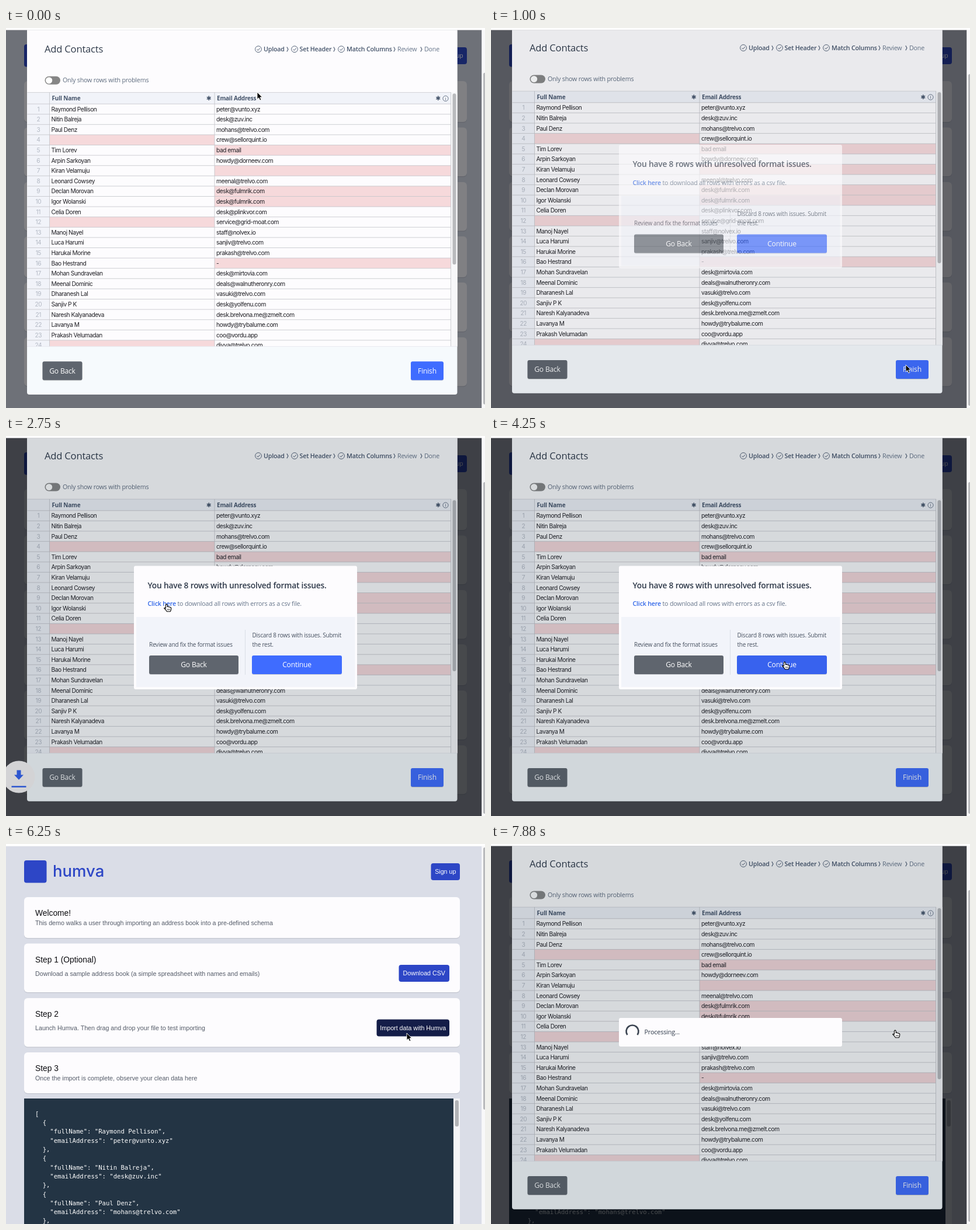
Write an HTML page that moves like this. It is 820 px wide and 651 px high and loops after 8 s.

```html
<!DOCTYPE html>
<html lang="en">
<head>
<meta charset="utf-8">
<title>Contact import</title>
<style>
  html, body { margin: 0; width: 100%; height: 100%; overflow: hidden; background: #fff; }
  svg { display: block; width: 820px; height: 651px; }
  text { white-space: pre; }
  .ui { font-family: "Open Sans", "Noto Sans", sans-serif; letter-spacing: -.2px; }
  .cell { font-family: Inter, Roboto, sans-serif; letter-spacing: -.46px; }
  .page { font-family: "Liberation Sans", Arial, sans-serif; }
  .logo { font-family: Inter, "Open Sans", sans-serif; font-weight: 500; }
  .code { font-family: "DejaVu Sans Mono", monospace; }
  .sym { font-family: "DejaVu Sans", sans-serif; }
</style>
</head>
<body>
<svg id="stage" viewBox="0 0 820 651" xmlns="http://www.w3.org/2000/svg"></svg>
<script>
const LOOP = 8000, TICK = 125, ROW = 17.6;
const WHITE = '#fdfcfe', BLUE = '#2d46c6', ACTION = '#3f6cff', SLATE = '#5f656e';

const contacts = [
  ['Raymond Pellison', 'peter@vunto.xyz'],
  ['Nitin Balreja', 'desk@zuv.inc'],
  ['Paul Denz', 'mohans@trelvo.com'],
  ['', 'crew@sellorquint.io'],
  ['Tim Lorev', 'bad email', 1],
  ['Arpin Sarkoyan', 'howdy@dorneev.com'],
  ['Kiran Velamuju', '', 1],
  ['Leonard Cowsey', 'meenal@trelvo.com'],
  ['Declan Morovan', 'desk@fulmrik.com', 1],
  ['Igor Wolanski', 'desk@fulmrik.com', 1],
  ['Celia Doren', 'desk@plinkvor.com'],
  ['', 'service@grid-moat.com'],
  ['Manoj Nayel', 'staff@nolvex.io'],
  ['Luca Harumi', 'sanjiv@trelvo.com'],
  ['Harukai Morine', 'prakash@trelvo.com'],
  ['Bao Hestrand', '-', 1],
  ['Mohan Sundravelan', 'desk@mirtovia.com'],
  ['Meenal Dominic', 'deals@walnutheronry.com'],
  ['Dharanesh Lal', 'vasuki@trelvo.com'],
  ['Sanjiv P K', 'desk@yolfenu.com'],
  ['Naresh Kalyanadeva', 'desk.brelvona.me@zmelt.com'],
  ['Lavanya M', 'howdy@trybalume.com'],
  ['Prakash Velumadan', 'coo@vordu.app'],
  ['', 'divya@trelvo.com']
];

const box = (x, y, w, h, fill, r = 0, more = '') =>
  `<rect x="${x}" y="${y}" width="${w}" height="${h}" rx="${r}" fill="${fill}" ${more}/>`;
const label = (cls, x, y, size, fill, str, more = '') =>
  `<text class="${cls}" x="${x}" y="${y}" font-size="${size}" fill="${fill}" ${more}>${str}</text>`;
const line = (x1, y1, x2, y2, color) =>
  `<path d="M${x1} ${y1}L${x2} ${y2}" stroke="${color}" stroke-width=".8"/>`;
const MID = 'text-anchor="middle"', SEMI = 'font-weight="600"', BOLD = 'font-weight="700"';

function button(cls, x, y, w, h, fill, str, size, more = '') {
  return box(x, y + 1, w, h, 'rgba(0,0,0,.16)', 3) + box(x, y, w, h, fill, 3, more) +
    label(cls, x + w / 2, y + h / 2 + size * .36, size, '#fff', str, MID);
}

// The demo page; "wide" is its layout while the importer is open.
function drawPage(wide, done, hover) {
  const dx = wide ? 12 : 0, w = 746 + dx;
  const card = (y, h) => box(31, y + 1.2, w, h, '#c3c6d0', 6) + box(31, y, w, h, WHITE, 6);
  const head = (y, str) => label('page', 50, y, 13.8, '#0b0b0f', str);
  const note = (y, str) => label('page', 50, y, 10.7, '#545b68', str);
  const btn = (x, y, bw, str, fill = BLUE) =>
    box(x + dx, y, bw, 29, fill, 4) +
    label('page', x + dx + bw / 2, y + 18.3, 10.7, '#fff', str, MID);

  let s = box(0, 3.5, 814.5, 648, '#dadde7') +
    box(31, 28, 38.5, 38.5, BLUE, 4) +
    label('logo', 80, 56, 27.5, BLUE, 'humva') +
    btn(727.5, 33, 49.5, 'Sign up') +
    card(91, 70) + head(123, 'Welcome!') +
    note(139, 'This demo walks a user through importing an address book into a pre-defined schema') +
    card(170.5, 83.5) + head(202.5, 'Step 1 (Optional)') +
    note(225.5, 'Download a sample address book (a simple spreadsheet with names and emails)') +
    btn(672.5, 207, 86.5, 'Download CSV') +
    card(264, 83.5) + head(295.5, 'Step 2') +
    note(318.5, 'Launch Humva. Then drag and drop your file to test importing') +
    btn(634.5, 300.5, 124.5, 'Import data with Humva', hover ? '#141d48' : BLUE) +
    card(357, 70) + head(388.5, 'Step 3') +
    note(405, 'Once the import is complete, observe your clean data here');

  if (!done) return s + card(436, 84) + card(530, 83.5);

  s += box(31, 436, w, 216, '#f4f4f6') + box(31, 436, w - 11, 216, '#233444') +
    box(768.5 + dx, 439, 6.5, 45, '#b2b3b6', 3.2);
  const json = [[0, '[']];
  for (const [name, mail] of contacts.slice(0, 3))
    json.push([2, '{'], [4, `"fullName": "${name}",`], [4, `"emailAddress": "${mail}"`], [2, '},']);
  json.forEach(([col, str], i) => {
    s += label('code', 50 + col * 6.33, 465.8 + i * 15.3, 10.6, '#fff', str);
  });
  return s;
}

function drawTable() {
  const top = 127.8, grid = '#c2c3c8', side = '#f1f3f9', ink = '#44536a';
  let s = box(36.5, 108, 725, 436, WHITE) + box(36.5, 108, 38, 436, side) +
    box(36.5, 108, 725, 19.8, side) + line(36.5, 108, 762, 108, grid);
  contacts.forEach(([name, mail, bad], i) => {
    const y = top + i * ROW, base = y + 12.5;
    if (!name) s += box(74.5, y, 282.5, ROW, '#f6d9db');
    if (bad) s += box(357, y, 404.5, ROW, '#f6d9db');
    s += line(36.5, y, 761.5, y, grid) +
      label('cell', 55.3, base, 10.2, '#b3b9c4', i + 1, MID) +
      label('cell', 77.5, base, 10.2, '#1d1d22', name) +
      label('cell', 360, base, 10.2, '#1d1d22', mail);
  });
  for (const x of [74.5, 357, 761.5]) s += line(x, 108, x, 544, grid);
  return s + label('ui', 78.5, 122, 10, ink, 'Full Name', BOLD) +
    label('ui', 361, 122, 10, ink, 'Email Address', BOLD) +
    label('sym', 347.5, 122, 10.5, ink, '✱', MID) +
    label('sym', 740, 122, 10.5, ink, '✱', MID) +
    `<circle cx="752.5" cy="118.5" r="4.6" fill="none" stroke="${ink}" stroke-width=".8"/>` +
    label('ui', 752.5, 121.3, 7.5, ink, 'i', MID) +
    box(762, 108, 10.5, 436, '#f7f7f9') + box(764.5, 110, 6, 293, '#b9babd', 3);
}

function drawSteps() {
  const ink = '#46556c', soft = '#66758a';
  const check = x => `<circle cx="${x}" cy="34" r="5.4" fill="none" stroke="${ink}" stroke-width=".9"/>` +
    `<path d="M${x - 2.5} 34.2l1.9 1.9 3.3-3.9" fill="none" stroke="${ink}"/>`;
  const chevron = x => `<path d="M${x - 1.2} 30.2l2.2 4-2.2 4" fill="none" stroke="${ink}" stroke-width="1.1"/>`;
  return [432, 494, 574].map(check).join('') + [482, 562, 665, 711].map(chevron).join('') +
    label('ui', 441, 38, 10.7, ink, 'Upload', SEMI) +
    label('ui', 502.5, 38, 10.7, ink, 'Set Header', SEMI) +
    label('ui', 583, 38, 10.7, ink, 'Match Columns', SEMI) +
    label('ui', 670, 38, 10.7, soft, 'Review') + label('ui', 716, 38, 10.7, soft, 'Done');
}

const modalArt = box(36, -10, 736.5, 635.7, '#f6fafd', 4) + box(36, -10, 736.5, 553, WHITE) +
  label('ui', 66, 39.8, 16.6, '#2f3a4a', 'Add Contacts') + drawSteps() +
  box(66.5, 80.5, 26.5, 14, '#868686', 7) + '<circle cx="73.6" cy="87.5" r="5.6" fill="#fff"/>' +
  label('ui', 97, 91, 10.7, '#5d6b7e', 'Only show rows with problems') +
  `<g clip-path="url(#tableClip)">${drawTable()}</g>` + line(36, 543.3, 772.5, 543.3, '#e2e6ec') +
  button('ui', 62.5, 569, 68, 32, SLATE, 'Go Back', 12.1) +
  button('ui', 693, 569, 56, 32, ACTION, 'Finish', 12.1) +
  box(36, -10, 736.5, 635.7, '#102230', 4, 'id="dim"');

const dialogArt = box(219, 222.5, 382, 211.5, WHITE, 3) + box(223, 310, 374.5, 120, '#f2f4fa') +
  label('ui', 242.5, 260.5, 13.8, '#2f3a4a', 'You have 8 rows with unresolved format issues.', SEMI) +
  label('ui', 242.5, 291, 10.7, '#66758a',
    `<tspan fill="#3066e8" font-weight="600">Click here</tspan> to download all rows with errors as a csv file.`) +
  line(409.5, 332, 409.5, 409, '#d4d8e0') +
  label('ui', 245, 360.5, 9.95, '#46505f', 'Review and fix the format issues') +
  label('ui', 421.5, 344.8, 9.95, '#46505f', 'Discard 8 rows with issues. Submit') +
  label('ui', 421.5, 360.5, 9.95, '#46505f', 'the rest.') +
  button('ui', 245, 376, 153, 32, SLATE, 'Go Back', 12.1) +
  button('ui', 421, 376, 154, 32, ACTION, 'Continue', 12.1, 'id="go"');

const busyArt = box(219, 298, 382, 49, WHITE, 3) +
  '<path id="spin" d="M233.4 327A10.5 10.5 0 1 1 250.6 327" fill="none" stroke="#3c4552" stroke-width="2.7"/>' +
  label('ui', 262.5, 326, 10.9, '#2f3a4a', 'Processing...');

const loadArt = '<circle cx="22" cy="584" r="27.5" fill="#d3d3d5"/>' +
  '<path d="M18.5 572.5h7v8h4.5l-8 8.5-8-8.5h4.5zM9.5 599.5h25v2.6h-25z" fill="#2d56cf"/>';

const arrowArt = '<path d="M0 0V12.2L2.8 9.6 4.8 14 6.9 13.1 5 8.8H8.8Z" fill="#000" stroke="#fff" stroke-width=".9"/>';
const handArt = '<path d="M-1.6 1.2Q-.2-.9 1.2 1.2V4.6Q2.6 3.6 3.6 5 5.2 4.4 5.9 5.7 7.6 5.3 7.8 7L7.4 10.2 6.2 12.8H.4' +
  'L-1.4 10-4.3 7.2Q-3.7 5.6-1.6 7.2Z" fill="#fff" stroke="#000" stroke-width="1.1" stroke-linejoin="round"/>' +
  '<path d="M1.6 8v2.6M3.4 8v2.6M5.2 8v2.6" stroke="#000" stroke-width=".7"/>';

const stage = document.getElementById('stage');
stage.innerHTML = `<defs>
    <clipPath id="tableClip">${box(36, 107.5, 737, 435.8, '#000')}</clipPath>
    <clipPath id="view">${box(0, 3.5, 820, 648, '#000')}</clipPath>
  </defs>
  ${box(0, 0, 820, 651, '#fff')}
  <g id="page" clip-path="url(#view)"></g>
  ${box(0, 3.5, 814.5, 648, '#04060a', 0, 'id="shade"')}
  <g clip-path="url(#view)"><g id="modal">${modalArt}</g></g>
  <g id="dialog">${dialogArt}</g><g id="busy">${busyArt}</g>
  <g id="load">${loadArt}</g>
  ${box(814.5, 3.5, 6, 648, '#f8f8f9')}${box(817, 0, 5, 10, '#b9babd', 2.5, 'id="thumb"')}
  <g id="arrow">${arrowArt}</g><g id="hand">${handArt}</g>`;

const el = {};
stage.querySelectorAll('[id]').forEach(n => el[n.id] = n);
const put = (id, attrs) => { for (const k in attrs) el[id].setAttribute(k, attrs[k]); };
const within = (t, a, b) => t >= a && t < b;
const smooth = u => u * u * (3 - 2 * u);

// Value at time t along keys [time, value...]
function track(keys, t, ease = u => u) {
  if (t <= keys[0][0]) return keys[0].slice(1);
  for (let i = 1; i < keys.length; i++) {
    const a = keys[i - 1], b = keys[i];
    if (t <= b[0]) {
      const u = ease((t - a[0]) / (b[0] - a[0]));
      return a.slice(1).map((v, k) => v + (b[k + 1] - v) * u);
    }
  }
  return keys[keys.length - 1].slice(1);
}

const pointer = [
  [0, 430, 110], [750, 710, 577], [1250, 710, 577], [2250, 275, 288], [3250, 275, 288],
  [4000, 503, 387], [4375, 503, 387], [4750, 506, 391], [5000, 506, 391], [5250, 548, 377],
  [5375, 548, 377], [5750, 634, 347], [5875, 634, 347], [6250, 686, 324], [6500, 692, 319]
];
const alert = [[875, 0], [1000, .5], [1125, .86], [1250, 1]];
const fade = [[4500, 1], [4625, .5], [4750, 0], [7625, 0], [7750, .5], [7875, 1]];
const loadFade = [[2375, 0], [2625, .8], [2750, 1], [2875, .85], [3250, 0]];

let pageKey = '';

function render(time) {
  const t = Math.floor(time / TICK) * TICK;
  const open = track(fade, t)[0], p = track(alert, t)[0];
  const scroll = track([[0, 2.3], [250, 0]], t)[0];

  const state = [open > 0, t >= 4500, within(t, 6125, 7750)];
  if (state.join() !== pageKey) {
    pageKey = state.join();
    el.page.innerHTML = drawPage(...state);
  }

  put('shade', { opacity: open * (1 - .5 * (1 - .45 * p)) });
  put('modal', { opacity: open, transform: `translate(0 ${scroll})` });
  put('dim', { opacity: .16 * p });
  put('dialog', { opacity: t < 4375 ? p ** .6 : 0, transform: `translate(0 ${-45 * (1 - p)})` });
  put('go', { fill: within(t, 3875, 4375) ? '#3862ee' : ACTION });
  put('busy', { opacity: t >= 4375 ? open : 0 });
  put('spin', { transform: `rotate(${(t - 7875) * .72} 242 321)` });
  put('load', { opacity: track(loadFade, t)[0], transform: `translate(0 ${(t - 2750) * .1})` });
  put('thumb', open ? { y: 79 - scroll, height: 568 } : { y: 6, height: 449 });

  const [x, y] = track(pointer, t, smooth);
  const hand = within(t, 750, 1000) || within(t, 2125, 3375) || within(t, 3875, 4500) || t >= 6375;
  const at = `translate(${x} ${y})`;
  put('arrow', { opacity: hand ? 0 : 1, transform: at });
  put('hand', { opacity: hand ? 1 : 0, transform: at });
}

const start = performance.now();
function loop() {
  render((performance.now() - start) % LOOP);
  requestAnimationFrame(loop);
}
render(0);
requestAnimationFrame(loop);
</script>
</body>
</html>
```
